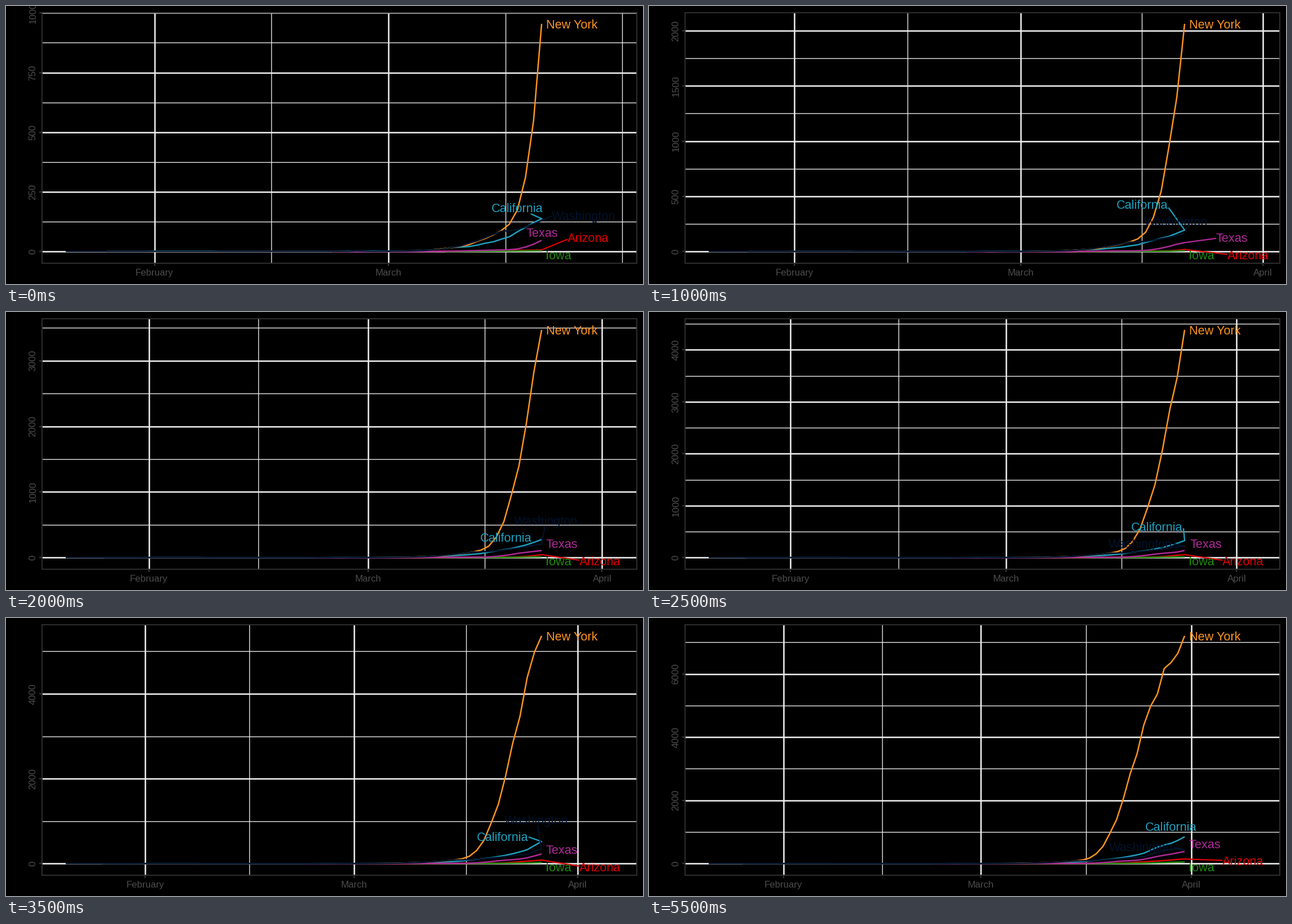
A matplotlib script for the animation above (6000 ms loop, 1131 px wide and 495 px high).

```python
import numpy as np
import matplotlib.pyplot as plt
from matplotlib.animation import FuncAnimation
from matplotlib.patches import Rectangle

W, H, DPI = 1131, 495, 64
PT = 72 / DPI
LEFT, RIGHT, TOP, BOTTOM = 64, 1120, 11.7, 457.5
X0, X1, Y0, Y1 = 106, 951, 437.3, 31.8
FIRST_LAST_DAY, LAST_DAY, FRAMES = 59, 70, 12

plt.rcParams["font.family"] = "Liberation Sans"
fig = plt.figure(figsize=(W / DPI, H / DPI), dpi=DPI, facecolor="black")
ax = fig.add_axes([0, 0, 1, 1])


def series(early, daily):
    """Sparse (day, value) points followed by daily values up to the last day."""
    first = LAST_DAY + 1 - len(daily)
    days = [d for d, _ in early] + list(range(first, LAST_DAY + 1))
    return np.array(days), np.array([v for _, v in early] + daily, float)


# Days count from 21 January.
DATA = {
    "Arizona": series([(5, 1), (49, 1), (54, 4)],
                      [6, 7, 12, 19, 30, 45, 57, 70, 83, 98, 114, 133, 146]),
    "California": series([(5, 1), (10, 1), (11, 2), (18, 2), (19, 1), (34, 1), (36, 3),
                          (40, 2), (43, 3), (45, 6)],
                         [9, 12, 18, 19, 21, 27, 35, 41, 52, 62, 83, 102, 121,
                          138, 166, 195, 233, 276, 328, 425, 520, 590, 640, 734, 849]),
    "Iowa": series([(47, 0), (54, 2), (59, 4), (64, 15)], [52]),
    "New York": series([(41, 1), (43, 2), (45, 4)],
                       [9, 13, 17, 23, 29, 43, 55, 70, 88, 115, 175, 311, 548,
                        954, 1397, 2061, 2844, 3469, 4384, 4980, 5366, 6172,
                        6358, 6650, 7203]),
    "Texas": series([(33, 0), (43, 0), (48, 2), (54, 7)],
                    [8, 11, 19, 31, 47, 67, 81, 94, 107, 136, 180, 227, 265,
                     300, 340, 382]),
    "Washington": series([(0, 1), (35, 1), (36, 3), (38, 1), (42, 2)],
                         [4, 6, 8, 12, 18, 24, 35, 45, 58, 72, 85, 88, 92, 104,
                          116, 130, 146, 167, 190, 207, 222, 290, 345, 400, 455,
                          460, 432]),
}
COLORS = {
    "Arizona": "#dd0000", "California": "#20a0be", "Iowa": "#1e8a08",
    "New York": "#ff941f", "Texas": "#b02a98", "Washington": "#00132b",
}
HALF_WIDTHS = {"Arizona": 38, "California": 47, "Iowa": 23, "New York": 47,
               "Texas": 29, "Washington": 58}

# Label centres at a few steps; the steps between are interpolated.
STEPS = [0, 2, 4, 5, 7, 9, 11]
LABELS = {
    "Arizona": ([1034, 1064, 1055, 1055, 1055, 1055, 1055],
                [412.5, 443.5, 443.5, 443.5, 443.5, 443.5, 432]),
    "California": ([908, 876, 888, 902, 882, 906, 927],
                   [359.5, 353, 401, 382.5, 389, 382, 371]),
    "Iowa": ([981] * 7, [443.5] * 7),
    "New York": ([1004.5] * 7, [31.8] * 7),
    "Texas": ([952, 1035, 987, 989, 987, 987, 987],
              [403, 412.5, 412.5, 412.5, 412.5, 412.5, 402]),
    "Washington": ([1026, 936, 959, 873, 942, 1023, 874],
                   [373, 383.5, 371, 412, 359, 382.5, 407]),
}


def line(x, y, color, width, **kw):
    ax.plot(x, y, color=color, lw=width * PT, **kw)


def text(x, y, s, size, color, **kw):
    ax.text(x, y, s, fontsize=size * PT, color=color, ha="center",
            va="baseline", zorder=6, **kw)


def grid_x(x, width):
    if LEFT < x < RIGHT:
        line([x, x], [TOP, BOTTOM], "#ebebeb", width, solid_capstyle="butt")


def grid_y(y, width):
    if TOP < y < BOTTOM:
        line([LEFT, RIGHT], [y, y], "#ebebeb", width, solid_capstyle="butt")


def y_step(peak):
    for limit, step in ((1000, 250), (2500, 500), (5000, 1000)):
        if peak < limit:
            return step
    return 2000


def draw_axes(px, py, peak):
    months = [(11, "February"), (40, "March"), (71, "April")]
    months = [(px(d), name) for d, name in months if px(d) < RIGHT]
    halves = [25.5, 55.5] if len(months) == 3 else [25.5, 54.5, 69]
    step = y_step(peak)
    values = [v for v in range(0, 8001, step) if py(v) > TOP]

    for d in halves:
        grid_x(px(d), 1.4)
    for v in values:
        grid_y(py(v + step / 2), 1.4)
    for v in values:
        grid_y(py(v), 2.6)
        line([LEFT - 5, LEFT], [py(v)] * 2, "#333333", 2.4, solid_capstyle="butt")
        text(52.3, py(v), str(v), 16.8, "#4d4d4d", rotation=90,
             rotation_mode="anchor")
    for x, name in months:
        grid_x(x, 2.6)
        line([x, x], [BOTTOM, BOTTOM + 5], "#333333", 2.4, solid_capstyle="butt")
        text(x, 480.3, name, 16.8, "#4d4d4d")


def draw_leader(x, y, cx, cy, half, color):
    """Connect a line's end to the edge of its label when they are far apart."""
    dx, dy, half_h = x - cx, y - cy, 11
    if abs(dx) <= half and abs(dy) <= half_h:
        return
    if abs(dy) * half > abs(dx) * half_h and abs(dy) > half_h:
        ex, ey = cx + dx * half_h / abs(dy), cy + np.sign(dy) * half_h
        if abs(dx) > half:
            ex, ey = cx + np.sign(dx) * half, cy + 0.15 * dy
    else:
        ex, ey = cx + np.sign(dx) * half, cy + 0.15 * dy
    if np.hypot(ex - x, ey - y) > 18.5:
        line([x, ex], [y, ey], color, 2.3, zorder=4)


def draw(step):
    ax.clear()
    ax.set(xlim=(0, W), ylim=(H, 0))
    ax.axis("off")
    last = FIRST_LAST_DAY + step
    peak = np.interp(last, *DATA["New York"])

    def px(day):
        return X0 + (X1 - X0) * day / last

    def py(value):
        return Y0 + (Y1 - Y0) * value / peak

    draw_axes(px, py, peak)
    for name, (days, counts) in DATA.items():
        color = COLORS[name]
        shown = np.append(days[days < last], last)
        values = np.interp(shown, days, counts)
        line(px(shown), py(values), color, 2.5, zorder=3, solid_capstyle="butt")
        xs, ys = LABELS[name]
        cx, cy = np.interp(step, STEPS, xs), np.interp(step, STEPS, ys)
        draw_leader(X1, py(values[-1]), cx, cy, HALF_WIDTHS[name], color)
        text(cx, cy + 7.7, name, 21.6, color)
    ax.add_patch(Rectangle((LEFT, TOP), RIGHT - LEFT, BOTTOM - TOP, fill=False,
                           ec="#333333", lw=1.8 * PT, zorder=5))
    return []


anim = FuncAnimation(fig, draw, frames=FRAMES, init_func=lambda: [],
                     interval=500, repeat=True, repeat_delay=0)
plt.show()
```
